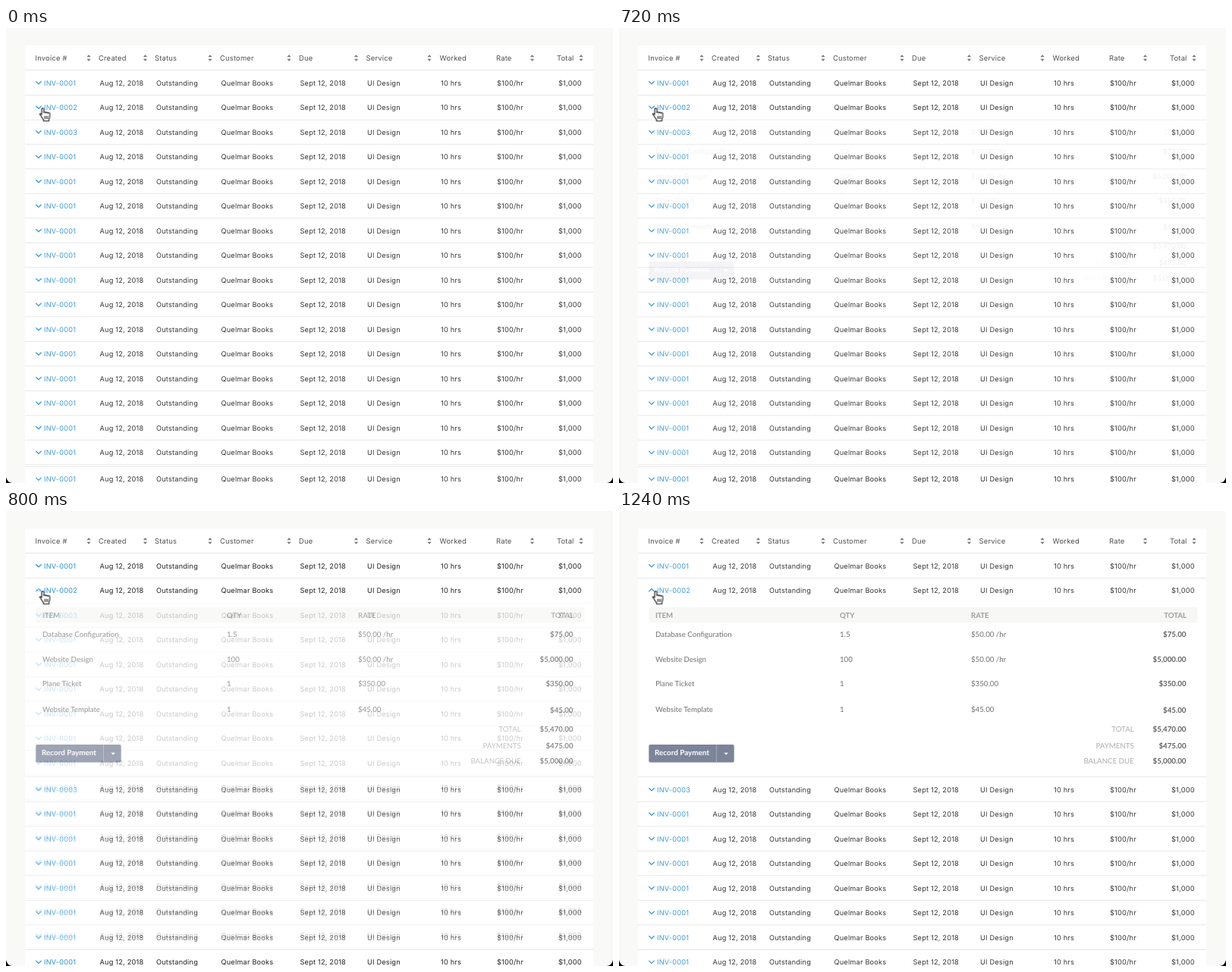
An HTML page that plays this animation: 800 by 600 pixels, repeating every 2.1 s.

```html
<!DOCTYPE html>
<html lang="en">
<head>
<meta charset="utf-8">
<title>Invoice table</title>
<style>
  html, body { margin: 0; width: 100%; height: 100%; overflow: hidden; background: #f9f9f8; }
  svg { display: block; width: 800px; height: 600px; }
  text { text-rendering: geometricPrecision; white-space: pre; }
  .head { font: 9.4px Inter, sans-serif; letter-spacing: .2px; fill: #505050; }
  .cell { font: 9.2px Inter, sans-serif; letter-spacing: .2px; fill: #363636; }
  .link { fill: #3f9bd5; }
  .chev { fill: none; stroke: #3f9bd5; stroke-width: 1.2; }
  .sort { fill: #777; }
  .rule { stroke: #e8e8e8; stroke-width: 1; }
  .item { font: 9.7px Lato, sans-serif; fill: #707070; }
  .label { fill: #adadad; }
  .caps { font-weight: 700; font-size: 9.6px; fill: #9c9c9c; }
  .sum { font-weight: 700; fill: #606060; }
  .btn { font-weight: 700; font-size: 9.9px; fill: #fff; }
  .end { text-anchor: end; }
  #open, #blend { opacity: 0; }
</style>
</head>
<body>
<svg viewBox="0 0 800 600">
  <rect width="800" height="600" fill="#f9f9f8"/>
  <rect x="25" y="23" width="749" height="577" fill="#fff"/>
  <g id="head"></g>
  <g id="closed"></g>
  <g id="open"></g>
  <g id="fixed"></g>
  <g id="blend"></g>
  <g transform="translate(-3.3 -9.6) scale(1.09)" stroke="#111" stroke-linejoin="round" stroke-linecap="round">
    <path fill="#fff" d="M46.1 107.1a1.3 1.3 0 0 1 2.6 0v4.2a1.2 1.2 0 0 1 2.4.3a1.2 1.2 0 0 1 2.4.5a1.2 1.2 0 0 1 2.4.6v3.3q0 1.6-1 3v2.3h-6.6v-1.8q-2-2.2-3.2-4.6q-1-1.6-1.4-2q.8-1.4 2.4.6z"/>
    <path fill="none" stroke-width=".8" d="M49.8 115.5v3M51.6 115.5v3M53.4 115.5v3"/>
  </g>
  <path d="M0 592V600H8Q1.5 599 0 592ZM800 592V600H792Q798.5 599 800 592Z"/>
</svg>
<script>
const LOOP = 2100, START = 700, MID = 770, END = 930;
const PITCH = 32.5;
const headings = ['Invoice #', 'Created', 'Status', 'Customer', 'Due', 'Service', 'Worked', 'Rate', 'Total'];
const headX = [38.5, 122, 196, 282, 386, 474.5, 571.5, 646, 726];
const sortX = [109, 183.5, 269, 373, 461.5, 558, 693.5, 758];
const cells = ['Aug 12, 2018', 'Outstanding', 'Quelmar Books', 'Sept 12, 2018', 'UI Design', '10 hrs', '$100/hr', '$1,000'];
const cellX = [123.5, 198, 283.5, 387.5, 476, 573, 647, 728];
const items = [
  [162, 'Database Configuration', '1.5', '$50.00 /hr', '$75.00'],
  [195, 'Website Design', '100', '$50.00 /hr', '$5,000.00'],
  [227, 'Plane Ticket', '1', '$350.00', '$350.00'],
  [261.5, 'Website Template', '1', '$45.00', '$45.00']
];
const sums = [
  [287.5, 'TOTAL', '$5,470.00'],
  [309, 'PAYMENTS', '$475.00'],
  [329, 'BALANCE DUE', '$5,000.00']
];

const $ = id => document.getElementById(id);
const text = (cls, x, y, s) => `<text class="${cls}" x="${x}" y="${y + 3.5}">${s}</text>`;
const rule = y => `<path class="rule" d="M25 ${y}H774"/>`;
const box = (x, y, w, h, fill, r = 0) =>
  `<rect x="${x}" y="${y}" width="${w}" height="${h}" rx="${r}" fill="${fill}"/>`;
const chevron = (y, dir = 1) =>
  `<path class="chev" d="M39.3 ${y - 1.8 * dir}L43 ${y + 1.8 * dir}L46.7 ${y - 1.8 * dir}"/>`;
const row = (y, no = 1, arrow = true) =>
  (arrow ? chevron(y) : '') + text('cell link', 50, y, 'INV-000' + no) +
  cells.map((s, i) => text('cell', cellX[i], y, s)).join('');
const rows = (count, y, firstNo) =>
  Array.from({ length: count }, (_, i) =>
    row(y + i * PITCH, i ? 1 : firstNo) + rule(y + 16.3 + i * PITCH)).join('');

$('head').innerHTML =
  headings.map((s, i) => text('head', headX[i], 39.5, s)).join('') +
  sortX.map(x => `<path class="sort" d="M${x - 2.6} 38.3h5.2l-2.6-3zM${x - 2.6} 40.7h5.2l-2.6 3z"/>`).join('') +
  rule(55.5) + rule(88.5);

$('closed').innerHTML = chevron(104.5) + rule(121.2) + rows(14, 137, 3);

$('open').innerHTML =
  box(38, 100, 10, 9, '#fff') + chevron(104.5, -1) +
  box(25, 120, 749, 458, '#fff') +
  box(39.5, 127, 723, 20, '#f7f7f6') +
  text('item caps', 48, 137, 'ITEM') + text('item caps', 291, 137, 'QTY') +
  text('item caps', 464, 137, 'RATE') + text('item caps end', 748, 137, 'TOTAL') +
  items.map(([y, name, qty, rate, total]) =>
    text('item', 48, y, name) + text('item', 291, y, qty) +
    text('item', 464, y, rate) + text('item sum end', 747.5, y + .5, total)).join('') +
  sums.map(([y, name, total]) =>
    text('item label end', 678.7, y, name) + text('item sum end', 747.5, y + .3, total)).join('') +
  box(39.3, 308, 112.4, 23.6, '#7b8499', 2) +
  '<path d="M128.5 308V331.6" stroke="#a3a9b8"/><path d="M138.4 318.8h5.6l-2.8 3z" fill="#fff"/>' +
  text('item btn', 47, 318.3, 'Record Payment') +
  rule(350.5) + rows(7, 367, 3);

// Rows that stay put look slightly heavier while both states overlap.
const fixed = row(72) + row(104.5, 2, false) + row(594.7);
$('fixed').innerHTML = rule(578.5) + fixed;
$('blend').innerHTML = fixed;

const play = (id, steps) => $(id).animate(
  steps.map(([ms, opacity, easing = 'linear']) => ({ offset: ms / LOOP, opacity, easing })),
  { duration: LOOP, iterations: Infinity });

play('open', [[0, 0], [START, 0, 'ease'], [END, 1], [LOOP, 1]]);
play('blend', [[0, 0], [START, 0, 'ease-in-out'], [MID, .4, 'ease-out'], [END, 0], [LOOP, 0]]);
</script>
</body>
</html>
```
